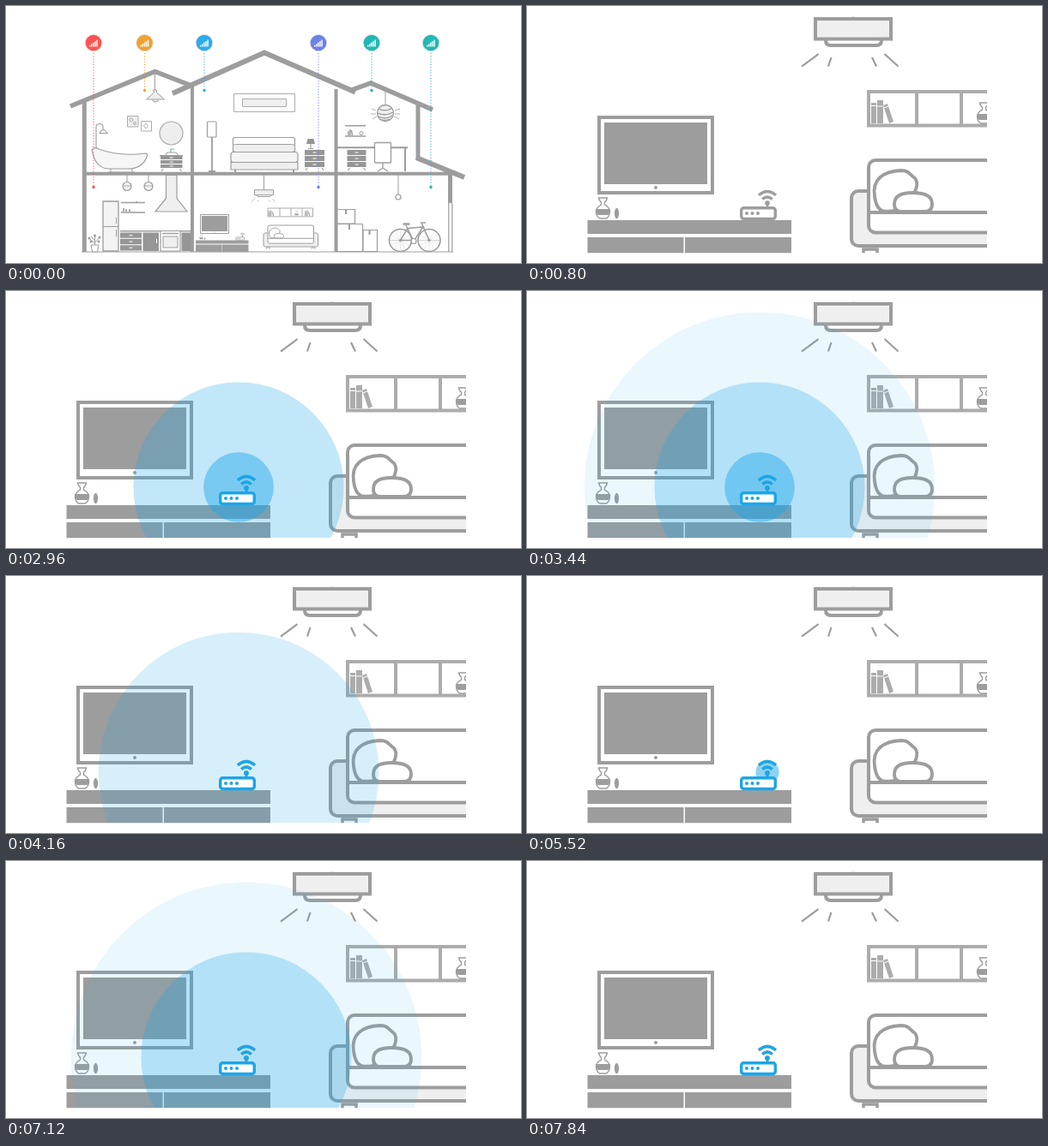
An HTML page with a canvas for the animation above (8 s loop, 600 px wide and 300 px high).

```html
<!DOCTYPE html>
<html lang="en">
<head>
<meta charset="utf-8">
<title>Smart home</title>
<style>
html, body { margin: 0; width: 100%; height: 100%; overflow: hidden; background: #fff; }
canvas { display: block; width: 600px; height: 300px; }
</style>
</head>
<body>
<canvas id="stage"></canvas>
<script>
const LOOP = 8000, STEP = 80;
const GREY = '#9d9d9d', MID = '#acacac', PALE = '#efefef', BLUE = '#1ca6e8', WHITE = '#fff';
const canvas = document.getElementById('stage');
const ctx = canvas.getContext('2d');
const dpr = window.devicePixelRatio || 1;
canvas.width = 600 * dpr;
canvas.height = 300 * dpr;

const clamp = v => Math.max(0, Math.min(1, v));
const ease = p => p < .5 ? 2 * p * p : 1 - 2 * (1 - p) * (1 - p);

// Stroke and/or fill an SVG path string.
function path(d, width, fill, color = GREY) {
  const p = new Path2D(d);
  if (fill) { ctx.fillStyle = fill; ctx.fill(p); }
  if (width) { ctx.lineWidth = width; ctx.strokeStyle = color; ctx.stroke(p); }
}

function box(x, y, w, h, width, fill, color = GREY, r = 0) {
  ctx.beginPath();
  ctx.roundRect(x, y, w, h, r);
  if (fill) { ctx.fillStyle = fill; ctx.fill(); }
  if (width) { ctx.lineWidth = width; ctx.strokeStyle = color; ctx.stroke(); }
}

function disc(x, y, r, width, fill, color = GREY, ry = r) {
  ctx.beginPath();
  ctx.ellipse(x, y, r, ry, 0, 0, 2 * Math.PI);
  if (fill) { ctx.fillStyle = fill; ctx.fill(); }
  if (width) { ctx.lineWidth = width; ctx.strokeStyle = color; ctx.stroke(); }
}

function clipTo(x, y, w, h) {
  ctx.beginPath();
  ctx.rect(x, y, w, h);
  ctx.clip();
}

function shell() {
  path('M91.3 110V287', 5);
  path('M217 92V287M384.5 97V287', 4);
  path('M480 113V180', 5);
  path('M89 195.7H519', 4);
  path('M517.5 197V230', 5);
  path('M515.8 230V287M519.8 230V287', 1.2);
  path('M88 287H521', 1.2);
  path('M75 117L173.5 76.5L216 93', 5.5);
  path('M400 99L425 90L497 121', 5.5);
  path('M194 102L301 54.5L407 100.5', 6);
  path('M478 177L534 200', 6);
}

// Chest of drawers with white gaps and small knobs.
function drawers(x, y, w, h, rows) {
  const rh = h / rows;
  for (let i = 0; i < rows; i++) {
    box(x, y + i * rh, w, rh - 1, 0, '#969696');
    box(x + w / 2 - 2, y + i * rh + rh / 2 - 1, 4, 1, 0, WHITE);
  }
}

function legs(x, y, w) {
  path(`M${x + 3} ${y}l-2 3M${x + w - 3} ${y}l2 3`, 1.2);
}

function bathroom() {
  path('M173.5 78V98', 1);
  path('M171.5 98h4v3l9 8h-21l9 -8zM170 109.5q4 5 8 0', 1, PALE);
  box(141.5, 128.5, 12.5, 12.5, 1, PALE, MID);
  box(157.5, 134.5, 12, 11.5, 1, WHITE, MID);
  disc(146, 133, 2, 1, null, MID);
  disc(150, 137, 1.5, 1, null, MID);
  path('M163 137l2.5 3l-2.5 3l-2.5 -3z', 1, null, MID);
  disc(192.5, 148.5, 13.5, 1.2, '#eee', MID);
  path('M105 167V141q0 -3.500 4 -3.500t4 3.500v3M109 148.500q4.500 -8 9 0z', 1.1);
  path('M100 168q2 -4 8 -1q25 9 54 5q4 0 2 4q-5 14 -22 14h-22q-16 0 -20 -22z', 1.2, '#f6f6f6');
  path('M122 190v4M147 190v4M119 194h31', 1);
  drawers(180, 175, 25.5, 15, 3);
  legs(180, 190, 25.5);
  path('M179 174.500h27M186 174q0 -3 3 -3h8q3 0 3 3', 1);
  path('M192 171v-4h4', 1.2, null, '#6bbcb3');
}

function bedroom() {
  box(265.5, 102.5, 71, 21, 1, WHITE, MID);
  box(275.5, 108.5, 51, 9, 1, PALE, MID);
  box(264.5, 153.5, 72, 20, 1.2, WHITE, GREY, 2);
  box(264.5, 161.5, 72, 9, 1, PALE, GREY, 3);
  box(262, 170.5, 78, 12, 1.2, '#f4f4f4', GREY, 3);
  box(262, 182.5, 78, 8.500, 1.2, PALE);
  path('M267 191v3M335 191v3', 2);
  box(234.500, 135, 10.500, 18, 1.2, WHITE, GREY, 1);
  path('M240 153V192M236 193h8', 1.800);
  drawers(348, 168, 23, 21, 3);
  legs(348, 189, 23);
  path('M351.500 155h7l1.500 6h-10z', 0, '#969696');
  path('M355 161v6M352 166.500h6', 1.200);
}

function office() {
  path('M442 97V116', 1);
  disc(442, 125, 9.5, 1.3, PALE);
  path('M434 120q8 4 16 -1M433 125q9 4 18 -1M434 129q8 4 16 -1M437 133q6 1 10 -1', 1.3);
  path('M431 122l-5 -2M431 126h-6M432 129l-5 3M453 122l6 -2M453 126h6M452 129l6 3', .8);
  path('M395 139.800h24M395 152h24', 1.500);
  path('M399 151v-5M401 151v-7M403.500 151l-1 -6', 1.500);
  disc(414, 148.500, 2, 1);
  path('M386 165.200h82M465 166V193', 2);
  drawers(397.5, 168, 22, 21, 3);
  legs(397.5, 189, 22);
  path('M439 183V190M433 193l6 -4l6 4', 1.3);
  box(429.5, 159.500, 19, 23.500, 1.3, WHITE, GREY, 1);
}

function kitchen() {
  path('M141 197V205M166 197V205', 1);
  for (const x of [141, 166]) {
    disc(x, 210.500, 5, 1.2, PALE);
    path(`M${x - 5} 210h10`, .8);
  }
  path('M186.500 197.500h12.500v27l12 15.500h-37l12.500 -15.500z', 1.2, PALE);
  box(113, 228, 18, 58, 1.3, '#f3f3f3');
  path('M113 257.500h18M128.500 247v7M128.500 261v8', 1);
  path('M134 229.500h28M134 241h28', 1.500);
  path('M137 240v-4M140 240v-3M144 240v-3M152 229v-1', 2, null, MID);
  path('M133 262.800h82', 1.600);
  drawers(133, 264.500, 25, 22, 3);
  box(159.5, 264.5, 18.500, 21.500, 0, '#969696');
  box(175, 272, 1, 5, 0, WHITE);
  box(180, 262.500, 23, 23.500, 1.2, WHITE);
  box(183, 269, 17, 13, 1, PALE);
  path('M182 265.500h19', 1.500);
  box(204.500, 264.500, 11, 21.500, 0, '#969696');
  path('M99 279h9l-1.500 8h-6z', 1, WHITE);
  path('M103.500 279V267M103.500 277l-7 -6M103.500 276l6 -6M103 273l-4 -4', 1);
  for (const [x, y] of [[103.5, 268], [97, 271], [109, 270], [99, 275], [108, 275]]) disc(x, y, 1.5, 0, GREY);
}

function garage() {
  path('M457 197V220', 1);
  disc(457, 223, 3, 1.2, WHITE);
  box(386, 237.500, 20.500, 16.500, 1.2, WHITE);
  box(386, 254.500, 29.500, 32, 1.2, WHITE);
  box(416, 261.500, 16.500, 25, 1.2, WHITE);
  path('M396 238v5M400 255v6M423.500 262v5', 2);
  for (const x of [459.5, 493]) {
    disc(x, 273.500, 13, 1.600);
    disc(x, 273.500, 1.500, 0, GREY);
    for (let a = 0; a < Math.PI; a += Math.PI / 6) {
      const dx = 12 * Math.cos(a), dy = 12 * Math.sin(a);
      path(`M${x - dx} ${273.5 - dy}L${x + dx} ${273.5 + dy}`, .25);
    }
  }
  path('M459.500 273.500L468 259.500L486 258L475 274.500L466 256M459.500 273.500H475M493 273.500L484 253h5', 1.500);
  path('M462.500 254.500h8', 2.500);
  disc(475, 274.500, 3, 1.2, WHITE);
}

function vase(x, y) {
  path(`M${x - 5} ${y}h10q-1 4 -3 5v3q6 3 6 8q0 5 -4 8h-8q-4 -3 -4 -8q0 -5 6 -8v-3q-2 -1 -3 -5z`, 1.4, WHITE);
  path(`M${x - 8} ${y + 13}h16q1 4 -2 7h-12q-3 -3 -2 -7z`, 0, GREY);
}

function books(x) {
  box(x, 117, 6, 20, 0, MID);
  box(x, 113, 6, 3, 0, MID);
  box(x + 7, 110, 7, 27, 0, MID);
  path(`M${x + 14} 116l5 -2l7 21l-5 2z`, 0, MID);
  path(`M${x + 7} 117h7M${x + 15} 119l5 -2`, 1, null, WHITE);
}

function router(color) {
  box(249.7, 235.7, 39.6, 12.800, 3.4, color === BLUE ? WHITE : null, color, 3);
  for (const x of [256, 262.500, 269]) disc(x, 242, 2, 0, color);
  disc(280, 230, 2.800, 0, color);
  path('M280 230V235', 2.600, null, color);
  path('M274.300 225.500q5.700 -5 11.400 0M270 220.800q10 -8.600 20 0', 3.2, null, color);
}

function sofa() {
  box(378, 216, 254, 64, 4, PALE, GREY, 8);
  box(398, 180, 214, 84.500, 4, WHITE, GREY, 8);
  path('M392 290V284H408V290M602 290V284H618V290', 3.500);
  path('M405 222C402 203 414 193 436 192C445 192 446 197 452 201C457 207 453 218 446 226C438 239 423 241 414 239C408 237 406 230 405 222z', 3.800, WHITE);
  path('M428 231C428 221 437 218 449 218C463 218 472 222 472 231C472 237 469 240 463 240H436C431 240 428 237 428 231z', 3.800, WHITE);
  path('M398 241H612', 4);
}

// Drawn at close-up size, four times the house scale.
function livingRoom() {
  path('M380 -54V14', 4);
  box(336, 15, 88, 23.500, 4, PALE);
  path('M348 40q0 6 6 6h53q6 0 6 -6', 4);
  path('M339.500 56L320 70.500M354.500 60L351 70.500M402 60L407 70.500M416.500 56L432.500 70.500', 2.2);
  path('M398 100H608V139.500H398zM454 100V139M506 100V139M558 100V139', 4, null, MID);
  books(401);
  books(570);
  vase(532.5, 113);
  sofa();
  box(84, 130, 132, 88, 4, WHITE);
  box(90, 136, 120, 72, 0, GREY);
  disc(150, 212, 2, 0, GREY);
  vase(88.500, 224);
  disc(104.500, 242, 2.600, 0, GREY, GREY, 6.2);
  box(62, 250, 246, 16, 0, GREY);
  box(62, 270, 120.500, 34, 0, GREY);
  box(184, 270, 124, 34, 0, GREY);
  router(GREY);
}

function pin(x, end, color) {
  ctx.setLineDash([1.2, 2]);
  path(`M${x} 55V${end}`, 1, null, color);
  ctx.setLineDash([]);
  disc(x, end, 1.700, 0, color);
  disc(x, 43, 10.300, 0, '#e6e6e6');
  disc(x, 43, 9.300, 0, color);
  for (let i = 0; i < 5; i++) box(x - 5 + i * 2.1, 45.8 - i * 1.600, 1.400, 1.700 + i * 1.600, 0, WHITE);
}

function pins() {
  pin(102, 211.5, '#ff5350');
  pin(161.5, 98.5, '#f2a02e');
  pin(231, 98.5, '#2cabed');
  pin(364, 211.5, '#6c82e6');
  pin(426, 98.5, '#20b9b5');
  pin(495, 211.5, '#20b9b5');
}

function house(zoom, pinAlpha) {
  ctx.save();
  clipTo(70.5, 12.8, 465.5, 275.4);
  ctx.translate(274, 281.33);
  ctx.scale(zoom, zoom);
  ctx.translate(-274, -281.33);
  if (zoom < 4) {
    shell();
    bathroom();
    bedroom();
    office();
    kitchen();
    garage();
  }
  ctx.save();
  ctx.translate(205.5, 211);
  ctx.scale(.25, .25);
  livingRoom();
  ctx.restore();
  if (pinAlpha > 0) {
    ctx.globalAlpha = pinAlpha;
    pins();
  }
  ctx.restore();
}

// Three rings that grow evenly and fade as they go.
function ripples(x, age) {
  ctx.save();
  clipTo(0, 25, 600, 263);
  for (let i = 0; i < 3; i++) {
    const p = (age - i * 480) / 1440;
    if (p <= 0 || p >= 1) continue;
    ctx.globalAlpha = .53 * (1 - p);
    disc(x, 229, 245 * p, 0, BLUE);
  }
  ctx.restore();
}

function draw(time) {
  const t = Math.floor((time % LOOP) / STEP) * STEP;
  const p = clamp((t - 160) / 640);
  ctx.setTransform(dpr, 0, 0, dpr, 0, 0);
  ctx.fillStyle = WHITE;
  ctx.fillRect(0, 0, 600, 300);
  house(1 + 3 * ease(p), 1 - 2 * p);
  ripples(271, t - 2240);
  ripples(280, t - 5440);
  ctx.globalAlpha = clamp((t - 2240) / 400);
  if (ctx.globalAlpha > 0) router(BLUE);
  ctx.globalAlpha = 1;
}

let start;
function tick(now) {
  start ??= now;
  draw(now - start);
  requestAnimationFrame(tick);
}
draw(0);
requestAnimationFrame(tick);
</script>
</body>
</html>
```
